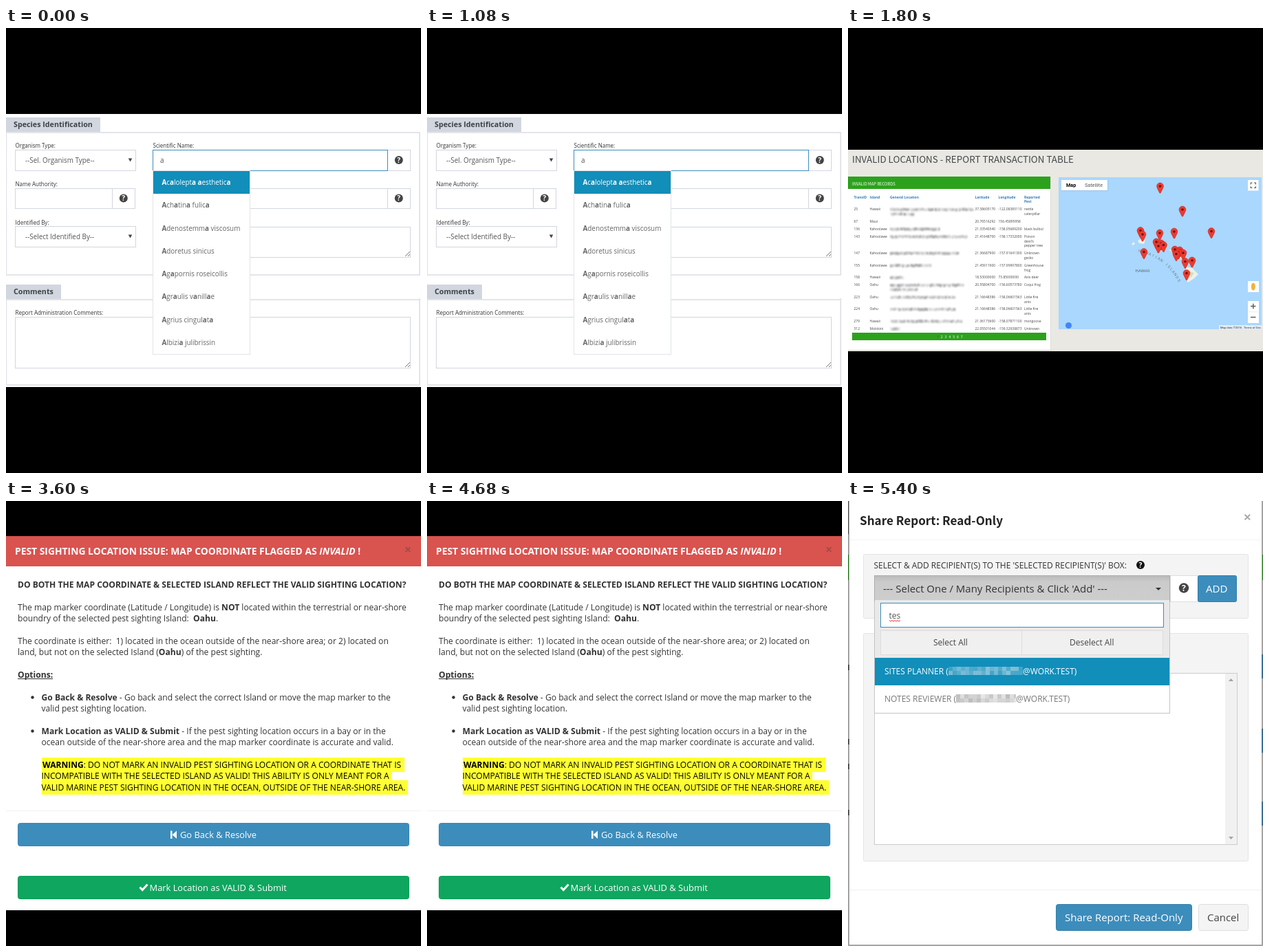
An HTML page with a canvas for the animation above (7200 ms loop, 603 px wide and 647 px high).

```html
<!DOCTYPE html>
<html lang="en">
<head>
<meta charset="utf-8">
<title>Pest report screens</title>
<style>
html, body { margin: 0; width: 100%; height: 100%; overflow: hidden; background: #000; }
canvas { display: block; width: 603px; height: 647px; }
</style>
</head>
<body>
<canvas id="stage" width="603" height="647"></canvas>
<script>
const W = 603, H = 647, HOLD = 1800;
const ctx = document.getElementById('stage').getContext('2d');
const OPEN = '"Open Sans", "Noto Sans", sans-serif';
const CJK = '"Noto Sans CJK SC", "Noto Sans CJK JP", "Noto Sans CJK", sans-serif';
const ROBOTO = 'Roboto, sans-serif';
const BLUE = '#3c8dbc', PICK = '#118eba', LINE = '#d2d6de';

let seed = 1;
function rand() {
  seed = (seed * 16807) % 2147483647;
  return seed / 2147483647;
}

function rect(x, y, w, h, fill) {
  ctx.fillStyle = fill;
  ctx.fillRect(x, y, w, h);
}

function box(x, y, w, h, stroke, fill = '#fff') {
  rect(x, y, w, h, fill);
  ctx.strokeStyle = stroke;
  ctx.lineWidth = 1;
  ctx.strokeRect(x + 0.5, y + 0.5, w - 1, h - 1);
}

function round(x, y, w, h, r, fill, stroke) {
  ctx.beginPath();
  ctx.roundRect(x + 0.5, y + 0.5, w - 1, h - 1, r);
  ctx.fillStyle = fill;
  ctx.fill();
  ctx.strokeStyle = stroke || fill;
  ctx.lineWidth = 1;
  ctx.stroke();
}

function dot(x, y, r, fill) {
  ctx.beginPath();
  ctx.arc(x, y, r, 0, Math.PI * 2);
  ctx.fillStyle = fill;
  ctx.fill();
}

function poly(points, fill) {
  ctx.beginPath();
  points.forEach(([x, y]) => ctx.lineTo(x, y));
  ctx.closePath();
  ctx.fillStyle = fill;
  ctx.fill();
}

function stroke(points, color, width = 1) {
  ctx.beginPath();
  points.forEach(([x, y]) => ctx.lineTo(x, y));
  ctx.strokeStyle = color;
  ctx.lineWidth = width;
  ctx.stroke();
}

// Returns the x position after the text.
function text(s, x, y, size, color, style = '', family = OPEN) {
  ctx.font = `${style} ${size}px ${family}`;
  ctx.fillStyle = color;
  ctx.fillText(s, x, y);
  return x + ctx.measureText(s).width;
}

// Parts between asterisks are bold, parts between underscores bold italic.
function rich(s, x, y, size, color) {
  for (const part of s.split(/(\*[^*]+\*|_[^_]+_)/)) {
    const style = part[0] === '*' ? 'bold' : part[0] === '_' ? 'italic bold' : '';
    x = text(style ? part.slice(1, -1) : part, x, y, size, color, style);
  }
  return x;
}

function help(x, y, r, color = '#444') {
  dot(x, y, r, color);
  ctx.textAlign = 'center';
  text('?', x, y + r * 0.62, r * 1.7, '#fff', 'bold');
  ctx.textAlign = 'left';
}

function cross(x, y, r, color) {
  stroke([[x - r, y - r], [x + r, y + r]], color, 2);
  stroke([[x - r, y + r], [x + r, y - r]], color, 2);
}

function caret(x, y, w, h, color) {
  poly([[x - w, y], [x + w, y], [x, y + h]], color);
}

function grip(x, y) {
  stroke([[x - 7, y], [x, y - 7]], '#777');
  stroke([[x - 3, y], [x, y - 3]], '#777');
}

function select(x, y, label) {
  box(x, y, 176, 31, LINE);
  text(label, x + 15, y + 19, 9.88, '#555');
  caret(x + 167.5, y + 12.5, 2.8, 5, '#444');
}

function tab(y, w, title) {
  rect(0, y + 21, 602, 2, '#e3e5ea');
  rect(0, y, w, 21, LINE);
  text(title, 11, y + 14, 10.73, '#3d4248', 'bold');
}

function formScene() {
  rect(0, 125, W, 397, '#fff');
  rect(0, 151, 1, 209, '#dcdfe5');
  rect(600, 151, 2, 209, '#e3e5ea');
  rect(0, 358, 602, 2, '#e3e5ea');
  rect(0, 393, 1, 127, '#dcdfe5');
  rect(600, 393, 2, 127, '#e3e5ea');
  rect(0, 518, 602, 2, '#e3e5ea');
  tab(130, 137, 'Species Identification');
  tab(373, 80, 'Comments');

  const label = (s, x, y) => text(s, x, y, 8.02, '#333');
  label('Organism Type:', 13.5, 174);
  label('Scientific Name:', 213.5, 174);
  label('Name Authority:', 13.5, 230);
  label('Identified By:', 13.5, 285.5);
  label('Report Administration Comments:', 13.5, 416.5);

  select(13, 177, '--Sel. Organism Type--');
  select(13, 288, '--Select Identified By--');
  box(554, 177, 34, 31, LINE);
  box(213, 177, 342, 31, BLUE);
  text('a', 224, 196, 9.88, '#555');
  box(13, 233, 142, 30, LINE);
  box(154, 233, 34, 30, LINE);
  box(213, 233, 342, 30, LINE);
  box(554, 233, 34, 30, LINE);
  help(570.8, 192, 6);
  help(170.8, 247.5, 6);
  help(570.8, 247.5, 6);
  box(213, 289, 375, 45, LINE);
  grip(587, 332);
  box(13, 420, 575, 75, LINE);
  grip(587, 493);

  box(213, 207, 142, 268, '#e2e4e8');
  rect(214, 208, 140, 33, PICK);
  ['Acalolepta aesthetica', 'Achatina fulica', 'Adenostemma viscosum', 'Adoretus sinicus',
    'Agapornis roseicollis', 'Agraulis vanillae', 'Agrius cingulata', 'Albizia julibrissin']
    .forEach((s, i) => rich(s.replace(/a/gi, '*$&*'), 226.5, 228 + i * 33.25, 9.88, i ? '#666' : '#fff'));
}

function smudge(x, y, w) {
  ctx.save();
  ctx.filter = 'blur(1px)';
  for (let i = 0; i < w; i += 2.5) {
    rect(x + i, y - 2 + rand(), 2.7, 3.5 + rand(), `rgba(70,70,75,${0.1 + rand() * 0.4})`);
  }
  ctx.restore();
}

function pin(x, y) {
  ctx.beginPath();
  ctx.arc(x, y, 4.9, Math.PI * 0.9, Math.PI * 0.1);
  ctx.quadraticCurveTo(x + 3.6, y + 4.2, x + 0.6, y + 10);
  ctx.lineTo(x - 0.6, y + 10);
  ctx.quadraticCurveTo(x - 3.6, y + 4.2, x - 4.7, y + 1.5);
  ctx.fillStyle = '#f0392f';
  ctx.fill();
  ctx.strokeStyle = '#b92a22';
  ctx.lineWidth = 0.6;
  ctx.stroke();
  dot(x, y, 1.8, '#6b1310');
}

function arcLabel(s, a, c, b) {
  ctx.textAlign = 'center';
  [...s].forEach((ch, i) => {
    const t = i / (s.length - 1), u = 1 - t;
    const at = k => u * u * a[k] + 2 * u * t * c[k] + t * t * b[k];
    const slope = k => u * (c[k] - a[k]) + t * (b[k] - c[k]);
    ctx.save();
    ctx.translate(at(0), at(1));
    ctx.rotate(Math.atan2(slope(1), slope(0)));
    text(ch, 0, 2, 5.6, '#6d7f8c', '', ROBOTO);
    ctx.restore();
  });
  ctx.textAlign = 'left';
}

function mapPanel() {
  ctx.save();
  ctx.beginPath();
  ctx.rect(306, 217, 295, 221);
  ctx.clip();
  rect(306, 217, 295, 221, '#a9d7fd');

  const land = '#eef0e6';
  poly([[412, 314], [415, 311], [417, 314], [414, 316]], land);
  poly([[421, 309], [427, 306], [432, 309], [430, 314], [423, 313]], land);
  poly([[443, 310], [452, 309], [463, 320], [459, 325], [448, 321]], land);
  poly([[466, 322], [478, 323], [490, 331], [488, 337], [479, 334]], land);
  poly([[491, 347], [500, 349], [509, 358], [503, 364], [494, 370], [489, 362]], land);
  poly([[496, 354], [503, 356], [498, 363]], '#cfe0bd');
  arcLabel('HAWAIIAN ISLANDS', [424, 324], [463, 333], [481, 367]);
  text('HAWAII', 417.5, 354.5, 6.1, '#55646f', '', ROBOTO);

  [[453.5, 230], [486, 264], [528, 295.5], [425, 294.5], [428, 300], [453, 298], [474, 296],
    [448, 311], [455, 313], [458.5, 315.5], [451, 317], [430, 325.5], [475, 322], [482, 323],
    [487, 327], [480, 326], [477, 328.5], [500, 338], [490, 339.5], [492, 356.5]]
    .forEach(p => pin(...p));

  rect(310, 221, 68, 16, 'rgba(0,0,0,.08)');
  rect(310, 221, 67, 15, '#fff');
  text('Map', 317, 231.4, 7.2, '#000', 'bold', ROBOTO);
  text('Satellite', 344, 231.4, 7.25, '#565656', '', ROBOTO);
  rect(581, 221, 15.5, 15.5, '#fff');
  for (const [sx, sy] of [[-1, -1], [1, -1], [-1, 1], [1, 1]]) {
    const x = 588.8 + sx * 3.6, y = 228.8 + sy * 3.6;
    stroke([[x - sx * 2.2, y], [x, y], [x, y - sy * 2.2]], '#666', 1.2);
  }
  rect(581, 368, 16, 16, '#fff');
  ctx.beginPath();
  ctx.ellipse(588.8, 376, 3, 5.5, 0, 0, Math.PI * 2);
  ctx.fillStyle = '#f2b33d';
  ctx.fill();
  rect(581, 397, 16, 32, '#fff');
  rect(583, 412.5, 12, 0.7, '#e2e2e2');
  stroke([[585, 404.5], [592.5, 404.5]], '#555', 1.4);
  stroke([[588.8, 400.7], [588.8, 408.3]], '#555', 1.4);
  stroke([[585, 420.5], [592.5, 420.5]], '#555', 1.4);
  dot(320.5, 432.5, 4.5, '#4285f4');
  rect(539, 432, 62, 6, 'rgba(245,245,245,.75)');
  text('Map data ©2016', 541, 436.6, 4.2, '#333', '', ROBOTO);
  text('Terms of Use', 575, 436.6, 4.2, '#333', '', ROBOTO);
  ctx.restore();
}

// y, id, island, smudge widths, latitude, longitude, pest
const ROWS = [
  [263.5, 25, 'Hawaii', [121, 34], '37.38605170', '-122.08385110', 'nettle|caterpillar'],
  [281, 67, 'Maui', [], '20.76516292', '156.45895958', ''],
  [292, 136, 'Kahoolawe', [72], '21.33540340', '-158.05689200', 'black bulbul'],
  [303, 143, 'Kahoolawe', [112], '21.41648700', '-158.17332000', "Poison|devil's|pepper tree"],
  [327, 147, 'Kahoolawe', [98], '21.36687900', '-157.91641300', 'Unknown|gecko'],
  [345, 155, 'Kahoolawe', [60], '21.45911900', '-157.99997800', 'Greenhouse|frog'],
  [362.5, 158, 'Hawaii', [19], '18.53000000', '73.85000000', 'Axis deer'],
  [373.5, 166, 'Oahu', [107, 38], '20.55804700', '-156.60573780', 'Coqui frog'],
  [391, 223, 'Oahu', [95], '21.16648386', '-158.06601563', 'Little fire|ants'],
  [408.5, 224, 'Oahu', [95], '21.16648386', '-158.06601563', 'Little fire|ants'],
  [426, 279, 'Hawaii', [103], '21.36173600', '-158.07871100', 'mongoose'],
  [437, 312, 'Molokini', [15], '22.05501044', '-159.32938873', 'Unknown'],
];

function tableScene() {
  rect(0, 177, W, 293, '#e9e8e3');
  text('INVALID LOCATIONS - REPORT TRANSACTION TABLE', 6, 196, 13.38, '#44464a', '300', CJK);
  rect(0, 216, 295, 253, '#dcdcd8');
  rect(0, 216, 294, 252, '#fff');
  rect(0, 216, 294, 18, '#2ca21c');
  text('INVALID MAP RECORDS', 6, 229, 5.87, '#fff', '', CJK);

  const cols = [8.5, 31.5, 61, 184.5, 218.5, 256];
  const put = (s, col, y) => text(s, cols[col], y, 4.95, '#444');
  ['TransID', 'Island', 'General Location', 'Latitude', 'Longitude', 'Reported']
    .forEach((s, i) => text(s, cols[i], 247.5, 4.94, '#337ab7', 'bold'));
  text('Pest', cols[5], 254, 4.94, '#337ab7', 'bold');
  for (const [y, id, island, hidden, lat, lon, pest] of ROWS) {
    const base = y + 1.8;
    put(id, 0, base);
    put(island, 1, base);
    hidden.forEach((w, i) => smudge(cols[2], y + i * 6.5, w));
    put(lat, 3, base);
    put(lon, 4, base);
    pest.split('|').forEach((s, i) => put(s, 5, base + i * 6.7));
  }
  rect(6, 443, 282, 11, '#2ca21c');
  for (let n = 1; n < 8; n++) text(n, 123.2 + n * 5.8, 450.5, 5.2, n > 1 ? '#fff' : '#1c6d12');
  mapPanel();
}

function alertScene() {
  const ink = '#333', size = 12.1;
  rect(0, 51, W, 544, '#fff');
  rect(0, 51, W, 44, '#d9534f');
  rich('*PEST SIGHTING LOCATION ISSUE: MAP COORDINATE FLAGGED AS *_INVALID_* !*', 13, 77.5, 13.87, '#fff');
  cross(584, 70.5, 3.3, '#a94a47');

  [
    [17, 126, '*DO BOTH THE MAP COORDINATE & SELECTED ISLAND REFLECT THE VALID SIGHTING LOCATION?*'],
    [17, 158.5, 'The map marker coordinate (Latitude / Longitude) is *NOT* located within the terrestrial or near-shore'],
    [17, 175, 'boundry of the selected pest sighting Island:  *Oahu*.'],
    [17, 207.5, 'The coordinate is either:  1) located in the ocean outside of the near-shore area; or 2) located on'],
    [17, 224, 'land, but not on the selected Island (*Oahu*) of the pest sighting.'],
    [51.5, 289.5, '*Go Back & Resolve* - Go back and select the correct Island or move the map marker to the'],
    [51.5, 305.5, 'valid pest sighting location.'],
    [51.5, 338.5, '*Mark Location as VALID & Submit* - If the pest sighting location occurs in a bay or in the'],
    [51.5, 355, 'ocean outside of the near-shore area and the map marker coordinate is accurate and valid.'],
  ].forEach(([x, y, s]) => rich(s, x, y, size, ink));
  const end = rich('*Options:*', 17, 257, size, ink);
  rect(17, 258, end - 17, 1, ink);
  dot(38.5, 285.5, 2.2, ink);
  dot(38.5, 334.5, 2.2, ink);

  rect(52, 373, 527, 21, '#ff3');
  rect(52, 393, 508, 15, '#ff3');
  rect(52, 406, 532, 21, '#ff3');
  [
    [53, 387.5, '*WARNING*: DO NOT MARK AN INVALID PEST SIGHTING LOCATION OR A COORDINATE THAT IS'],
    [51.5, 404, 'INCOMPATIBLE WITH THE SELECTED ISLAND AS VALID! THIS ABILITY IS ONLY MEANT FOR A'],
    [51.5, 420.5, 'VALID MARINE PEST SIGHTING LOCATION IN THE OCEAN, OUTSIDE OF THE NEAR-SHORE AREA.'],
  ].forEach(([x, y, s]) => rich(s, x, y, 12.06, '#000'));
  rect(0, 450, W, 1, '#f1f1f1');

  round(17, 468, 569, 34, 3, BLUE, '#3a88b5');
  rect(239, 479.5, 2.5, 11.5, '#fff');
  poly([[248, 479.5], [248, 491], [241.5, 485.2]], '#fff');
  text('Go Back & Resolve', 253, 490, 12.88, '#fff');
  round(17, 545, 569, 34, 3, '#0fa65f', '#0e9e59');
  stroke([[194.5, 561.5], [198.2, 565.5], [205.5, 557.5]], '#fff', 3);
  text('Mark Location as VALID & Submit', 208.5, 566.5, 12.9, '#fff');
}

function mosaic(x, y, w, tone) {
  for (let i = 0; i < w; i += 6) {
    for (let j = 0; j < 2; j++) {
      rect(x + i, y + j * 6, Math.min(6, w - i), 6, `rgba(${tone},${0.2 + rand() * 0.4})`);
    }
  }
}

function recipient(name, y, hostX, color, tone) {
  const x = Math.round(text(`${name} (`, 53, y, 12, color));
  mosaic(x, Math.round(y - 11), hostX - x, tone);
  text('@WORK.TEST)', hostX, y, 12, color);
}

function shareScene() {
  rect(0, 0, W, H, '#a5a3a3');
  rect(0, 0, 1, 48, '#555');
  rect(0, 78, 1, 37, '#1c8a10');
  rect(602, 78, 1, 37, '#1c8a10');
  [223, 331, 437].forEach(y => rect(601, y, 2, 35, '#3a6f92'));
  [238, 346, 382, 449].forEach(y => rect(0, y, 2, 8, '#555'));
  rect(2, 0, 599, 645, '#fff');

  text('Share Report: Read-Only', 17, 34.5, 17.1, '#222', 'bold', CJK);
  cross(580.3, 23.5, 3.8, '#aaa');
  rect(2, 56, 599, 1, '#f4f4f4');
  round(22, 77, 560, 94, 2, '#f4f4f4', '#e4e4e4');
  round(22, 192, 560, 332, 2, '#f4f4f4', '#e4e4e4');
  rect(2, 565, 599, 1, '#f0f0f0');

  text("SELECT & ADD RECIPIENT(S) TO THE 'SELECTED RECIPIENT(S)' BOX:", 37.5, 98, 11.97, '#333');
  help(425, 93, 6, '#111');
  box(468, 108, 41, 39, '#ddd');
  help(488, 126.5, 7.2);
  const shade = ctx.createLinearGradient(0, 108, 0, 146);
  shade.addColorStop(0, '#b9b9b9');
  shade.addColorStop(0.25, '#cbcbcb');
  shade.addColorStop(1, '#cdcdcd');
  box(38, 108, 430, 39, '#adadad', shade);
  text("--- Select One / Many Recipients & Click 'Add' ---", 51, 133, 14.96, '#333');
  caret(451, 126, 4, 4, '#333');
  round(508, 108, 57, 39, 2, BLUE, '#367fa9');
  text('ADD', 520, 133, 15, '#fff');

  box(38, 250, 528, 250, '#ccc');
  rect(548, 251, 17, 248, '#f1f1f1');
  caret(556.5, 262, 3.5, -4, '#a3a3a3');
  caret(556.5, 488, 3.5, 4, '#a3a3a3');

  box(38, 146, 430, 163, '#c4c4c4');
  rect(39, 144, 428, 84, '#e9e9e9');
  box(47, 148, 412, 36, BLUE);
  text('tes', 59.5, 171, 11.97, '#555');
  const wave = [];
  for (let x = 60; x <= 76; x += 2) wave.push([x, 173.5 + (x / 2 % 2) * 1.6]);
  stroke(wave, '#e33');
  box(47, 188, 206, 36, '#ddd', '#f0f0f0');
  box(252, 188, 206, 36, '#ddd', '#f0f0f0');
  text('Select All', 124, 210, 12, '#444');
  text('Deselect All', 322, 210, 12, '#444');
  rect(39, 228, 428, 40, PICK);
  recipient('SITES PLANNER', 252, 254, '#fff', '225,235,240');
  recipient('NOTES REVIEWER', 291.5, 244, '#777', '140,140,140');

  round(302, 586, 198, 39, 3, BLUE, '#367fa9');
  text('Share Report: Read-Only', 315, 611, 15, '#fff');
  round(509, 586, 73, 39, 3, '#f4f4f4', '#ddd');
  text('Cancel', 522, 611, 14.95, '#444');
}

const scenes = [formScene, tableScene, alertScene, shareScene];
const start = performance.now();
let shown = -1;

function tick() {
  const index = Math.floor((performance.now() - start) / HOLD) % scenes.length;
  if (index !== shown) {
    shown = index;
    seed = 4217;
    rect(0, 0, W, H, '#000');
    scenes[index]();
  }
  requestAnimationFrame(tick);
}
tick();
</script>
</body>
</html>
```
